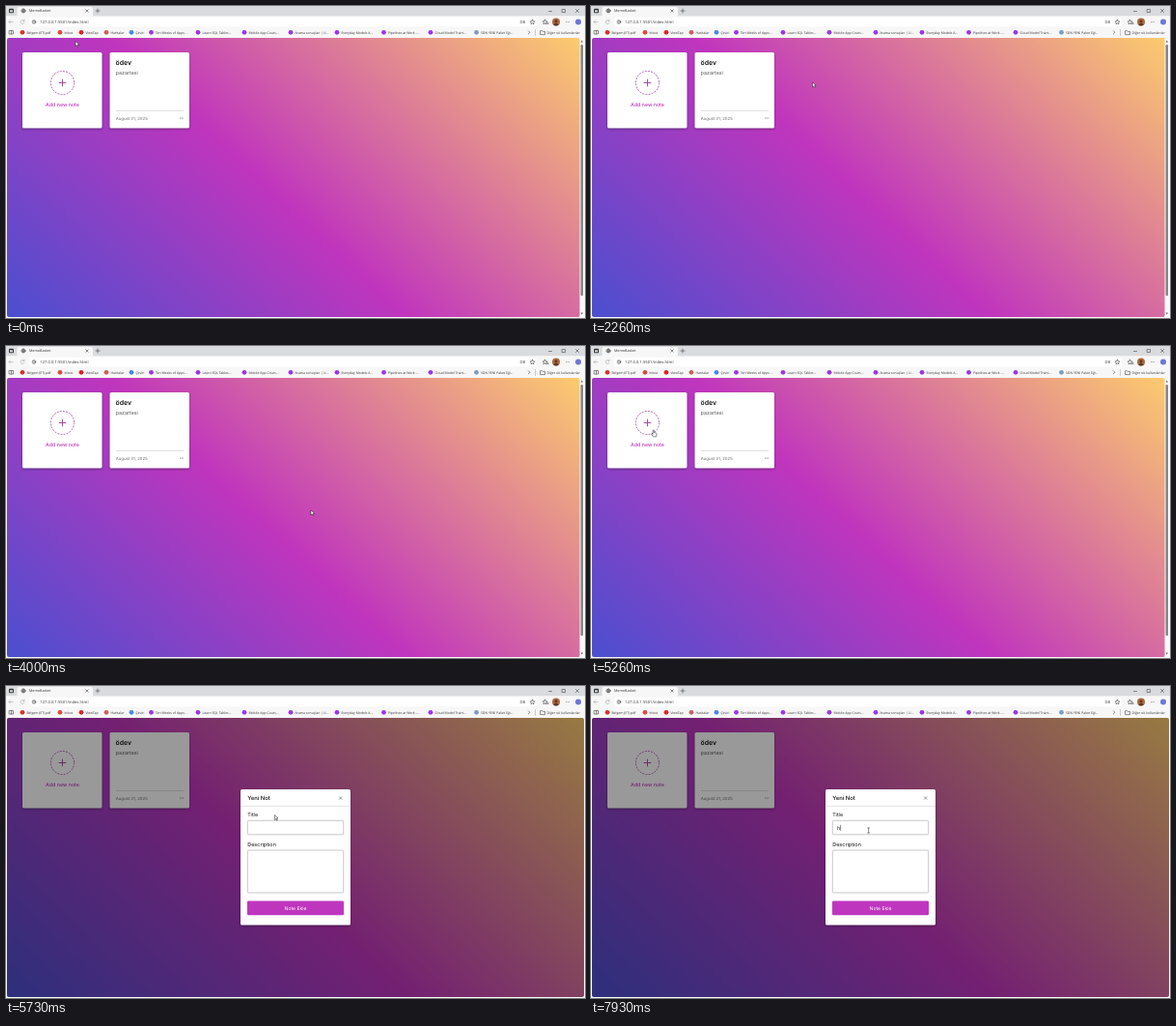
Write an HTML page that moves like this. It is 600x323 px and loops after 8 s.

```html
<!DOCTYPE html>
<html lang="tr">
<head>
<meta charset="utf-8">
<title>MemoBasket</title>
<style>
  html, body { margin: 0; width: 100%; height: 100%; overflow: hidden; background: #f7f7f7; }
  #page {
    position: absolute; left: 1px; top: 33px; width: 593.5px; height: 289px; border-radius: 2px;
    background: linear-gradient(43deg, #4a4fcf, #c035bd 46%, #fccb6e);
  }
  svg { position: absolute; left: 0; top: 0; width: 600px; height: 323px; }
  text { font-family: Inter, sans-serif; text-rendering: geometricPrecision; }
  .ui text, text.ui { font-family: "Open Sans", sans-serif; font-size: 3.45px; fill: #333; }
  .line { fill: none; stroke: #444; stroke-width: .6; stroke-linecap: round; stroke-linejoin: round; }
  .soft { stroke: #aaa; }
  .card { fill: #fff; filter: drop-shadow(0 1px 1.2px rgba(0, 0, 0, .4)); }
  .field { fill: #fff; stroke: #a2a2a2; stroke-width: .6; }
  .cursor { fill: #fff; stroke: #222; stroke-width: .55; stroke-linejoin: round; }
</style>
</head>
<body>
<div id="page"></div>
<svg viewBox="0 0 600 323">
  <!-- browser window -->
  <g class="ui">
    <path fill="#d9dbde" d="M0 0H600V10.5H0z"/>
    <path fill="#f7f7f7" d="M0 10.5H600V33H0zM11.500 10.500V3q0-2 2-2H88q2 0 2 2V10.500z"/>
    <rect x="24" y="11.700" width="525.500" height="9.600" rx="2" fill="#fff"/>
    <rect x="3" y="2.700" width="5" height="4.600" rx="1" fill="#333"/>
    <path d="M4 4.300H7V6.300H4z" fill="#d9dbde"/>
    <g class="line">
      <circle cx="18" cy="5" r="2"/>
      <path d="M16 5H20M18 3Q16.400 5 18 7Q19.600 5 18 3"/>
      <path d="M82.800 3.800l2.400 2.400m0-2.400l-2.400 2.400M93 5h4m-2-2v4"/>
      <path d="M562.500 5.500h3M576.500 3.500h3v3h-3zM590.500 3.500l3 3m0-3l-3 3"/>
      <path class="soft" d="M7 16.500H3m1.800-1.800L3 16.500l1.800 1.800"/>
      <path class="soft" d="M18.900 15.500a2 2 0 1 0 .1 1.800m0-3.200v1.500h-1.500"/>
      <circle cx="29" cy="16.500" r="1.800"/><path d="M29 16.300v1.100m0-2v.1"/>
      <path id="star" d="M545.500 14.200l.75 1.500 1.650.25-1.200 1.200.3 1.650-1.500-.8-1.500.8.3-1.650-1.200-1.200 1.650-.25z"/>
      <use href="#star" x="13"/><path d="M560.500 17.200h1.500m-1 1.300h1"/>
      <path d="M541.400 25.800l1.500 1.500-1.500 1.500"/>
      <path class="soft" d="M548.500 24.500v6"/>
      <path d="M554 25.700h1.600l.7.700h2.200v3.200H554z"/>
      <path d="M3.500 25.500h4v3.500h-4zM5.500 25.500v3.500"/>
    </g>
    <circle cx="570" cy="16.500" r="4" fill="#ad6a3c"/>
    <circle cx="570" cy="15.800" r="1.500" fill="#5b3a2c"/>
    <path d="M567.300 19.400q2.700-4 5.400 0q-2.700 2-5.400 0" fill="#5b3a2c"/>
    <g fill="#555"><circle cx="580.500" cy="16.500" r=".45"/><circle cx="582" cy="16.500" r=".45"/><circle cx="583.500" cy="16.500" r=".45"/></g>
    <circle cx="593" cy="16.500" r="3" fill="#6d78d6"/>
    <text x="24" y="6.400" style="font-size:3.7px">MemoBasket</text>
    <text x="35.300" y="18" style="font-size:4.15px">127.0.0.1:5501/index.html</text>
    <text x="532.500" y="17.900" style="font-size:4px">DB</text>
    <text x="560.500" y="28.600">Diğer sık kullanılanlar</text>
    <g id="bookmarks"></g>
  </g>

  <!-- notes -->
  <g id="scrollbar">
    <path fill="#f8f8f8" d="M594.500 33H599V322H594.500z"/>
    <rect x="595.500" y="40" width="2.500" height="260" rx="1.250" fill="#858585"/>
    <path fill="#666" d="M595.500 37.500l1.250-2 1.250 2zM595.500 317.500l1.250 2 1.250-2z"/>
  </g>
  <rect class="card" x="17" y="48" width="82.500" height="78.500" rx="1.600"/>
  <rect class="card" x="107.500" y="48" width="82.500" height="78.500" rx="1.600"/>
  <g fill="none" stroke="#9c3a9a">
    <circle cx="58.500" cy="79.500" r="12.100" stroke-width=".8" stroke-dasharray="1.900 1.270"/>
    <path d="M54.700 79.500h7.600m-3.800-3.800v7.600" stroke-width=".9"/>
  </g>
  <text x="58.500" y="103.700" text-anchor="middle" font-size="5.3" font-weight="500" fill="#c035bd">Add new note</text>
  <text x="113.600" y="60.500" font-size="6.9" font-weight="600" fill="#111">ödev</text>
  <text x="113.800" y="70.600" font-size="5.3" fill="#575757">pazartesi</text>
  <path d="M113.800 108.500H184" stroke="#ccc" stroke-width=".6"/>
  <text x="113.800" y="118.300" font-size="4.3" fill="#6d6d6d">August 31, 2025</text>
  <g fill="#6d6d6d"><circle cx="180.600" cy="116" r=".5"/><circle cx="182" cy="116" r=".5"/><circle cx="183.400" cy="116" r=".5"/></g>

  <!-- dialog -->
  <rect id="dim" x="1" y="33" width="598" height="289" rx="2" opacity="0"/>
  <g id="dialog" opacity="0">
    <rect class="card" x="243" y="107" width="114" height="140.500" rx="1.600"/>
    <text x="250.200" y="117.900" font-size="5.9" font-weight="500" fill="#111">Yeni Not</text>
    <path d="M345.200 114.500l3 3m0-3l-3 3" stroke="#555" stroke-width=".6"/>
    <path d="M243 124.500H357" stroke="#ccc" stroke-width=".5"/>
    <text x="250.200" y="135.200" font-size="5.3" fill="#111">Title</text>
    <rect class="field" x="250.300" y="139.300" width="99.400" height="14.500" rx="1.300"/>
    <text x="250.200" y="165.900" font-size="5.5" fill="#111">Description</text>
    <rect class="field" x="250.300" y="170" width="99.400" height="44" rx="1.300"/>
    <rect x="250" y="222.500" width="100" height="14.800" rx="1.300" fill="#bf36be"/>
    <text x="300" y="231.800" text-anchor="middle" font-size="5.05" fill="#fff">Note Ekle</text>
    <text id="typed" x="255" y="148.500" font-size="5.3" fill="#222">h</text>
    <path id="caret" d="M0 143.800v6" stroke="#111" stroke-width=".5"/>
  </g>

  <!-- pointers -->
  <path id="arrow" class="cursor" d="M0 0v5l1.200-1.100.8 1.800.9-.4-.8-1.800h1.600z"/>
  <path id="hand" class="cursor" d="M-.6.300q.6-.7 1.200 0V2.500l2.200.7q.7.300.5 1.100l-.5 2.500H-.4l-1.700-2.400q.4-.9 1.500 0z"/>
  <path id="beam" class="line" d="M-.9-2.500h1.800M0-2.500v5M-.9 2.500h1.800"/>
</svg>
<script>
const $ = id => document.getElementById(id);
const LOOP = 8000, OPEN = 5340, FADE = 220, FOCUS = 6500, TYPE = 7860, BLINK = 530;
const PURPLE = "#9a35e8";

// icon x, icon colour, label
const bookmarks = [
  [17, "#d8322c", "Belgem (ET).pdf"], [56, "#dd4b3e", "Inbox"], [78, "#e0222a", "ViewTap"],
  [104, "#c9605a", "Haritalar"], [130, "#4a86e8", "Çeviri"],
  [150.5, PURPLE, "Ten Weeks of Apps..."], [199, PURPLE, "Learn SQL Tables..."],
  [247, PURPLE, "Mobile App Cours..."], [295, PURPLE, "Arama sonuçları | U..."],
  [343, PURPLE, "Everyday Models A..."], [391.5, PURPLE, "Pipelines at Work -..."],
  [440, PURPLE, "Cloud Model Traini..."], [487.5, "#7b9cc4", "SON YENİ Paket Eği..."]
];
$("bookmarks").innerHTML = bookmarks.map(([x, color, label]) =>
  `<circle cx="${x}" cy="27.300" r="2.400" fill="${color}"/><text x="${x + 4.4}" y="28.600">${label}</text>`).join("");

// time, x, y of the pointer tip
const path = [
  [0, 72, 36.5], [1260, 158, 58.5], [2260, 229.5, 79], [3800, 316, 170], [4100, 316, 170],
  [5100, 64.8, 87], [5340, 64.8, 87], [5700, 278.3, 133.5], [5800, 278.3, 133.5],
  [6400, 287.6, 149.5], [LOOP, 287.6, 149.5]
];
const ease = p => p * p * (3 - 2 * p);

function pointerAt(t) {
  const i = path.findIndex(key => key[0] > t);
  const [t0, x0, y0] = path[i - 1], [t1, x1, y1] = path[i];
  const p = ease((t - t0) / (t1 - t0));
  return [x0 + (x1 - x0) * p, y0 + (y1 - y0) * p];
}

const show = (id, on) => $(id).style.display = on ? "" : "none";
const inside = (x, y, l, t, r, b) => x > l && x < r && y > t && y < b;

function draw(t) {
  const open = t >= OPEN;
  const shown = ease(Math.min(1, Math.max(0, (t - OPEN) / FADE)));
  $("page").style.width = open ? "598px" : "593.5px";
  show("scrollbar", !open);
  $("dim").setAttribute("opacity", .4 * shown);
  $("dialog").setAttribute("opacity", shown);
  const scale = .95 + .05 * shown;
  $("dialog").setAttribute("transform", `translate(300 177.500) scale(${scale}) translate(-300 -177.500)`);

  const typed = t >= TYPE;
  show("typed", typed);
  show("caret", t >= FOCUS && (t - (typed ? TYPE : FOCUS)) % (2 * BLINK) < BLINK);
  $("caret").setAttribute("transform", `translate(${typed ? 258.6 : 255} 0)`);

  const [x, y] = pointerAt(t);
  const kind = !open && inside(x, y, 17, 48, 99.5, 126.5) ? "hand"
    : open && inside(x, y, 250, 139, 350, 154) ? "beam" : "arrow";
  for (const id of ["arrow", "hand", "beam"]) show(id, id === kind);
  $(kind).setAttribute("transform", `translate(${x} ${y})`);
}

const start = performance.now();
function tick() {
  draw((performance.now() - start) % LOOP);
  requestAnimationFrame(tick);
}
tick();
</script>
</body>
</html>
```
